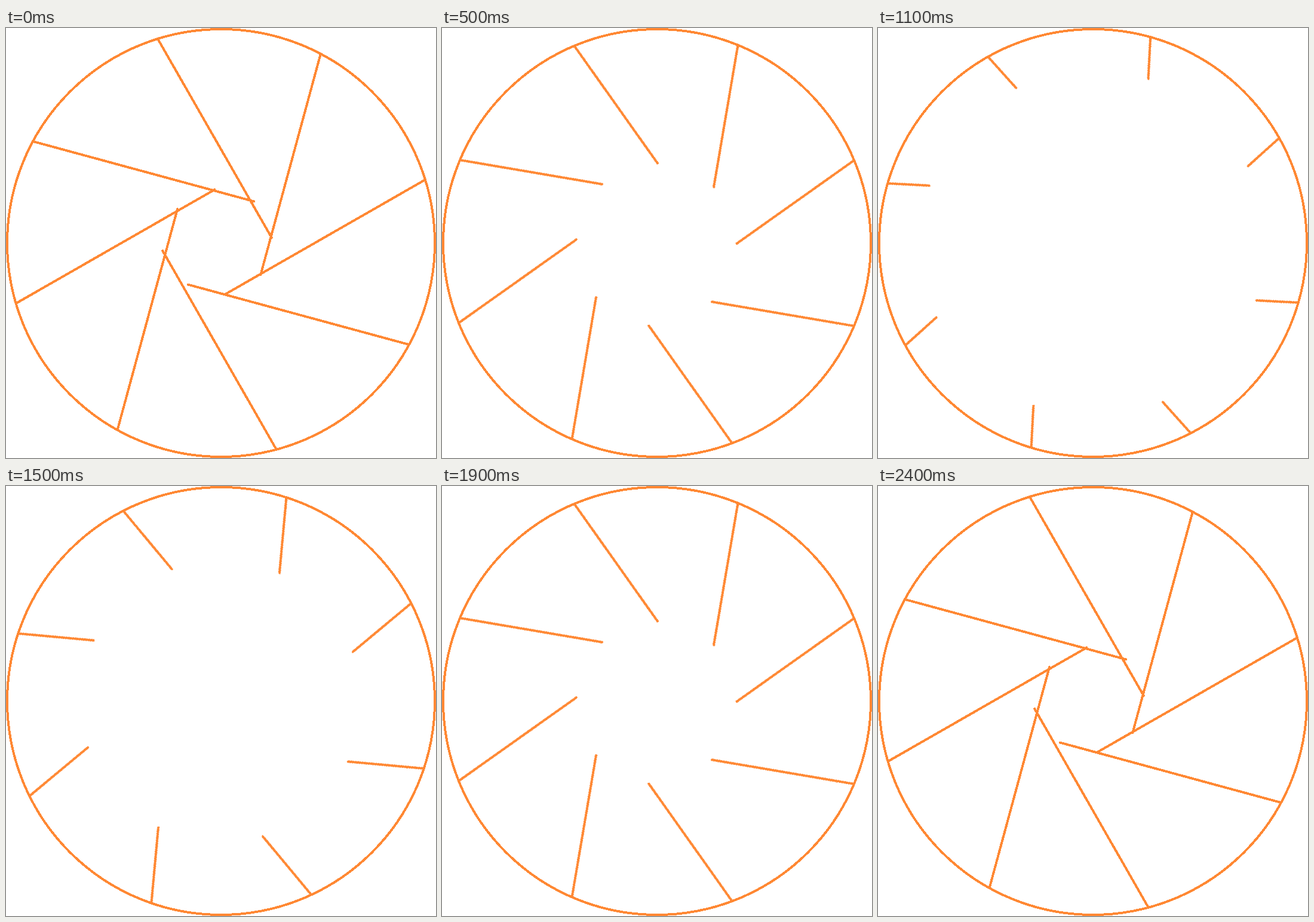
An HTML page that plays this animation: 720 px wide and 720 px high, repeating every 2500 ms.

```html
<!DOCTYPE html>
<html lang="en">
<head>
<meta charset="utf-8">
<title>Iris shutter</title>
<style>
  html, body { margin: 0; width: 100%; height: 100%; overflow: hidden; background: #fff; }
  svg { display: block; width: 100vw; height: 100vh; }
  circle, line { fill: none; stroke: #ff8833; stroke-width: 4; stroke-linecap: round; }

  /* 12 steps to open, then 13 held poses from fully open back to closed */
  #blades { transform-origin: 360px 360px; animation: turn 2500ms infinite; }
  line { stroke-dasharray: 383 500; animation: retract 2500ms infinite; }

  @keyframes turn {
    0% { transform: rotate(0deg); animation-timing-function: steps(12, jump-end); }
    48% { transform: rotate(-13.3deg); animation-timing-function: steps(13, jump-none); }
    100% { transform: rotate(0deg); }
  }
  @keyframes retract {
    0% { stroke-dashoffset: 0px; animation-timing-function: steps(12, jump-end); }
    48% { stroke-dashoffset: 342px; animation-timing-function: steps(13, jump-none); }
    100% { stroke-dashoffset: 0px; }
  }
</style>
</head>
<body>
<svg viewBox="0 0 720 720" shape-rendering="crispEdges">
  <circle cx="360" cy="360" r="358"/>
  <g id="blades"></g>
</svg>
<script>
const CENTER = 360, RADIUS = 357.5, LENGTH = 383;

// Where each blade meets the rim when closed, in degrees.
const RIM = [-17.2, -62.2, -107.2, -151.6, -196.4, -241, -285, -331.6];

const polar = (x, y, r, deg) => {
  const a = deg * Math.PI / 180;
  return [x + r * Math.cos(a), y + r * Math.sin(a)];
};

const blades = document.getElementById("blades");
RIM.forEach((rim, i) => {
  const [x1, y1] = polar(CENTER, CENTER, RADIUS, rim);
  const [x2, y2] = polar(x1, y1, LENGTH, 150.2 - 45 * i);
  const line = document.createElementNS("http://www.w3.org/2000/svg", "line");
  for (const [name, value] of Object.entries({ x1, y1, x2, y2 })) line.setAttribute(name, value);
  blades.append(line);
});
</script>
</body>
</html>
```
